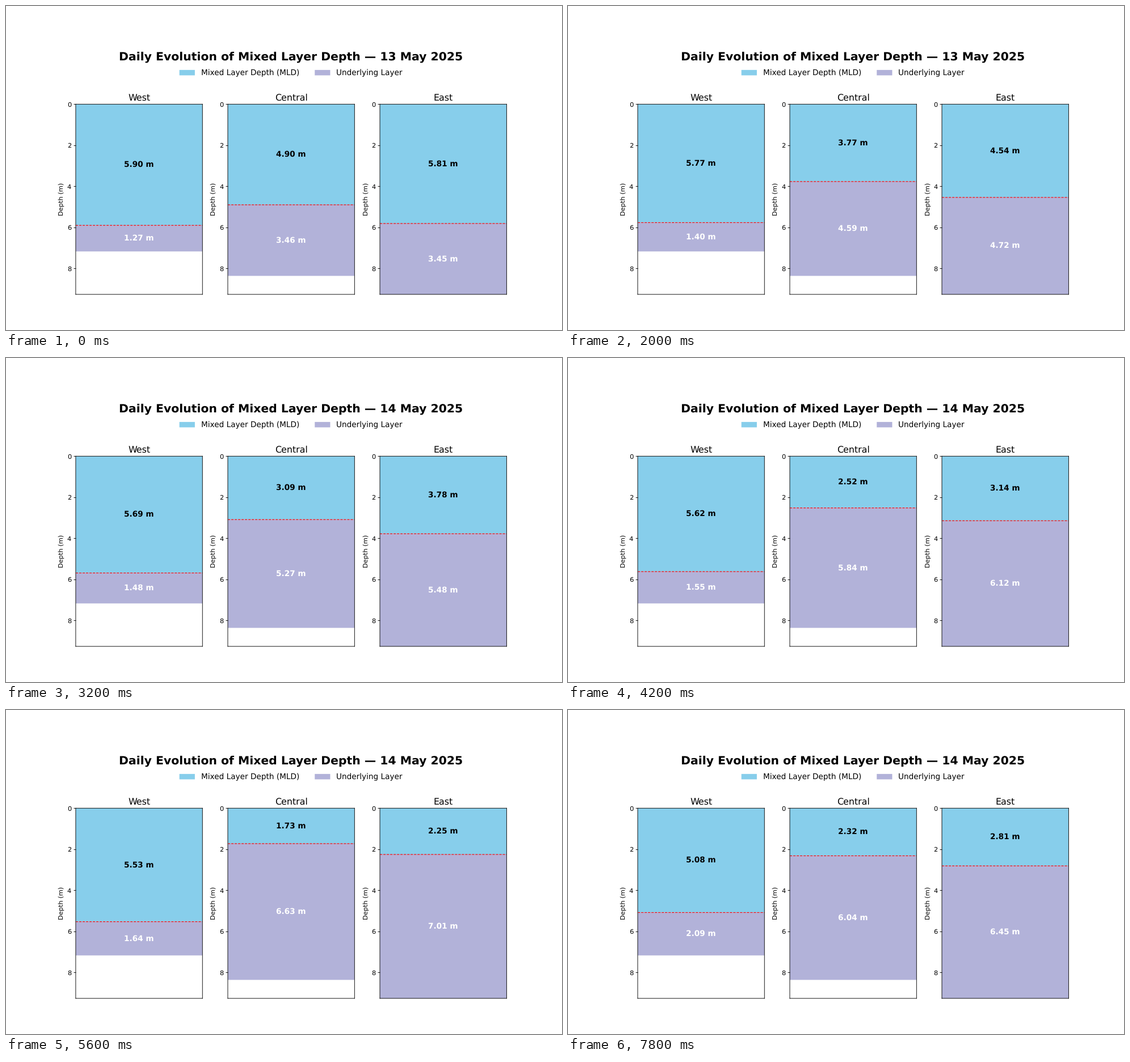
Animation of 980 by 572 pixels, one loop 8 s. Source, as a matplotlib script:

```python
import matplotlib.pyplot as plt
import numpy as np
from matplotlib.animation import FuncAnimation
from matplotlib.patches import Patch

W, H, DPI = 980, 572, 80
S = W / (12 * DPI)  # type scale for a 12 inch wide layout
STEP = 30           # frames from one daily value to the next
FRAMES = 40
MLD_COLOR, LOW_COLOR = "skyblue", "#b2b2d9"

# Region: mixed layer depth on successive days, total depth
REGIONS = {
    "West": ([5.90, 5.50, 4.10], 7.17),
    "Central": ([4.90, 1.50, 4.23], 8.36),
    "East": ([5.81, 2.00, 4.70], 9.26),
}
MAX_DEPTH = max(total for _, total in REGIONS.values())

plt.rcParams.update({
    "font.family": "DejaVu Sans",
    "font.size": 10 * S,
    "text.hinting": "none",
    "axes.linewidth": 0.8 * S,
    "path.snap": False,  # keep edges at their sub-pixel places
})


class Panel:
    def __init__(self, ax, name, depths, total):
        self.depths, self.total = depths, total
        ax.set_title(name, fontsize=14 * S)
        ax.set_ylabel("Depth (m)")
        ax.set_xlim(-0.5, 0.5)
        ax.set_ylim(MAX_DEPTH, 0)
        ax.set_xticks([])
        ax.set_yticks(range(0, 9, 2))
        self.top = ax.bar(0, 1, width=1, color=MLD_COLOR)[0]
        self.low = ax.bar(0, 1, width=1, color=LOW_COLOR)[0]
        self.line = ax.axhline(0, color="red", ls="--", lw=S)
        self.top_text = self.label(ax, "black")
        self.low_text = self.label(ax, "white")

    @staticmethod
    def label(ax, color):
        return ax.text(0, 0, "", color=color, ha="center", va="center",
                       fontsize=12 * S, fontweight="bold")

    def update(self, day):
        mld = np.interp(day, range(len(self.depths)), self.depths)
        rest = self.total - mld
        self.top.set_height(mld)
        self.low.set_y(mld)
        self.low.set_height(rest)
        self.line.set_ydata([mld, mld])
        self.top_text.set_y(mld / 2)
        self.top_text.set_text(f"{mld:.2f} m")
        self.low_text.set_y(mld + rest / 2)
        self.low_text.set_text(f"{rest:.2f} m")


fig, axes = plt.subplots(1, 3, figsize=(W / DPI, H / DPI), dpi=DPI)
fig.subplots_adjust(left=0.1254, right=0.9004, bottom=0.11, top=0.697, wspace=0.2)
panels = [Panel(ax, name, *data) for ax, (name, data) in zip(axes, REGIONS.items())]

title = fig.suptitle("", x=0.5125, y=0.86, fontsize=18 * S, fontweight="bold")
fig.legend(
    handles=[Patch(color=MLD_COLOR, label="Mixed Layer Depth (MLD)", lw=0),
             Patch(color=LOW_COLOR, label="Underlying Layer", lw=0)],
    loc="upper center", bbox_to_anchor=(0.5125, 0.826), ncol=2,
    frameon=False, fontsize=12 * S)


def update(i):
    day = i / STEP
    # daily values sit at noon, so the date turns halfway between them
    date = 13 + int(day + 0.5)
    title.set_text(f"Daily Evolution of Mixed Layer Depth — {date} May 2025")
    for panel in panels:
        panel.update(day)
    return []


anim = FuncAnimation(fig, update, frames=FRAMES, interval=200,
                     init_func=lambda: update(0), repeat=True,
                     repeat_delay=0, blit=False)
plt.show()
```
